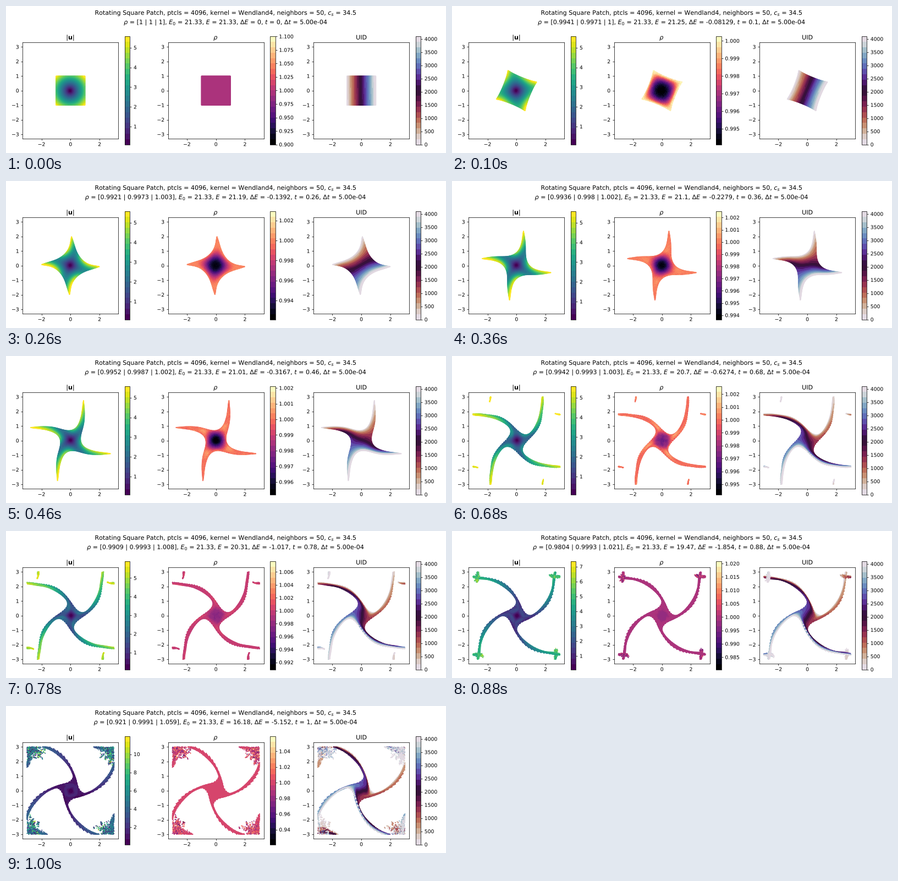
These frames come from a looping animation (800 by 267 pixels, 1020 ms). A matplotlib script:

```python
import numpy as np
import matplotlib.pyplot as plt
from matplotlib.animation import FuncAnimation
from matplotlib.patheffects import Normal
from matplotlib.text import Text
from numpy.polynomial.legendre import legvander

W, H, DPI = 800, 267, 64
FRAMES, INTERVAL = 51, 20
OMEGA, E0 = 4.0, 21.328

S = 25 / 24  # type and line scale
plt.rcParams.update({
    "font.family": "DejaVu Sans", "font.size": 10 * S, "text.hinting": "no_hinting",
    "axes.linewidth": 0.8 * S, "axes.titlepad": 6 * S,
})
for side in ("xtick", "ytick"):
    plt.rcParams.update({f"{side}.major.size": 3.5 * S, f"{side}.major.width": 0.8 * S,
                         f"{side}.major.pad": 3.5 * S})

# time, density min / mean / max, energy change, top speed
KNOTS = np.array([
    (0.00, 1.0000, 1.0000, 1.00000, 0.0, 5.57),
    (0.10, 0.9941, 0.9971, 1.00025, -0.08129, 5.57),
    (0.26, 0.9921, 0.9973, 1.0029, -0.1392, 5.57),
    (0.46, 0.9952, 0.9987, 1.0021, -0.3167, 5.57),
    (0.68, 0.9942, 0.9993, 1.0026, -0.6274, 5.57),
    (0.76, 0.9930, 0.9993, 1.0050, -0.8500, 5.60),
    (0.88, 0.9804, 0.9993, 1.0208, -1.854, 7.35),
    (1.00, 0.9210, 0.9991, 1.0590, -5.152, 11.95),
]).T


def simulate(n=41, c=20.0, sub=250):
    """Free patch of fluid on a Lagrangian mesh, spinning clockwise."""
    a = np.linspace(-1, 1, n)
    h = a[1] - a[0]
    x, y = np.meshgrid(a, a, indexing="ij")
    z = x + 1j * y
    v = -1j * OMEGA * z
    w = np.full(n, h)
    w[[0, -1]] /= 2
    mass = np.outer(w, w)
    m = 1 - ((a[1:] + a[:-1]) / 2) ** 2
    p0 = -9.4 * np.outer(m, m)

    def pressure(d1, d2):
        area = 0.5 * (d1.real * d2.imag - d1.imag * d2.real)
        return p0 + c * c * (1 - area / h**2)

    def diagonals():
        return z[1:, 1:] - z[:-1, :-1], z[:-1, 1:] - z[1:, :-1]

    def smooth(v, k=0.04):
        dx, dy = np.diff(v, 2, axis=0), np.diff(v, 2, axis=1)
        out = v.copy()
        for i, f in enumerate((-k, 2 * k, -k)):
            out[i:n - 2 + i] += f * dx
            out[:, i:n - 2 + i] += f * dy
        return out

    states = []
    for frame in range(FRAMES):
        p = np.pad(pressure(*diagonals()), 1)
        p = (p[1:, 1:] + p[:-1, 1:] + p[1:, :-1] + p[:-1, :-1]) / 4
        states.append((z.copy(), v.copy(), p / p[n // 2, n // 2]))
        if frame == FRAMES - 1:
            break
        # the late flow runs a little ahead of the clock
        dt = 0.02 / sub * (1 + 0.36 * (frame * 0.02) ** 5)
        kick = dt / mass
        for step in range(sub):
            d1, d2 = diagonals()
            p = 0.5j * pressure(d1, d2)
            g1, g2 = p * d2, p * d1
            f = np.zeros_like(z)
            f[1:, 1:] -= g1
            f[:-1, :-1] += g1
            f[:-1, 1:] += g2
            f[1:, :-1] -= g2
            v += kick * f
            if step % 10 == 0:
                v = smooth(v)
            z += dt * v
    return a, states


mesh, STATES = simulate()
M, DEG = 96, 15
grid = (np.arange(M) + 0.5) * 2 / M - 1
LIFT = legvander(grid, DEG) @ np.linalg.pinv(legvander(mesh, DEG))
cell = np.floor((grid + 1) * 32)
uid = np.add.outer(64 * cell, cell).ravel()


def particles(k):
    """Positions, speed and density of all particles in frame k."""
    t = k * 0.02
    rng = np.random.default_rng(7)
    z, v, p = ((LIFT @ q @ LIFT.T).ravel() for q in STATES[k])
    pos = np.column_stack([z.real, z.imag])
    speed = np.abs(v)
    rho = np.ones(p.size)
    if k:
        dip = min(1 - np.interp(t, KNOTS[0], KNOTS[1]), 0.0128 * np.exp(-2.13 * t))
        rho += rng.normal(0, 2e-4, p.size) - dip * np.clip(p, -0.3, 1)

    # periodic box, where arms crumple once they meet each other
    mix = np.clip((t - 0.78) / 0.22, 0, 1)
    over = np.maximum(np.abs(pos) - 3, 0)
    depth = (0.55 + 0.3 * mix) * np.tanh(over / 0.8)
    pos = np.where(over > 0, -np.sign(pos) * (3 - depth), pos)
    hit = mix**2 * np.clip(over.max(axis=1) / 0.3, 0, 1)
    clump = rng.integers(24, size=p.size)
    pos += 0.22 * hit[:, None] * rng.normal(size=(24, 2))[clump]
    pos = np.where(np.abs(pos) > 3, (pos + 3) % 6 - 3, pos)
    speed = speed * (1 + hit * rng.uniform(-0.9, 0.9, p.size))
    rho += 0.02 * hit * rng.normal(size=p.size)
    return pos, speed, rho


def box(x, y, w, h):
    return [x / W, 1 - (y + h) / H, w / W, h / H]


fig = plt.figure(figsize=(W / DPI, H / DPI), dpi=DPI, facecolor="white")
PANELS = ((r"$|\mathbf{u}|$", "viridis"), (r"$\rho$", "magma"), ("UID", "twilight_r"))
dots = []
for i, (title, cmap) in enumerate(PANELS):
    left = 264.4 * i
    ax = fig.add_axes(box(30.2 + left, 66.3, 174.2, 174.7))
    sc = ax.scatter(uid * 0, uid * 0, c=uid, s=5, lw=0, cmap=plt.get_cmap(cmap, 20))
    ax.set(xlim=(-3.3, 3.3), ylim=(-3.3, 3.3), xticks=(-2, 0, 2), yticks=range(-3, 4))
    ax.set_title(title)
    fig.colorbar(sc, cax=fig.add_axes(box(215.75 + left, 55.3, 9.7, 196.3)))
    dots.append(sc)


def line(y, text=""):
    return fig.text(0.5, 1 - y / H, text, ha="center", va="baseline", size=12 * S)


line(16, "Rotating Square Patch, ptcls = 4096, kernel = Wendland4, "
         "neighbors = 50, $c_s$ = 34.5")
status = line(33)


def draw(k):
    t = k * 0.02
    lo, mean, hi, de, top = (np.interp(t, KNOTS[0], row) for row in KNOTS[1:])
    pos, speed, rho = particles(k)
    for sc, val in zip(dots, (speed, rho, uid)):
        sc.set_offsets(pos)
        sc.set_array(val)
    dots[0].set_clim(0.088, top)
    dots[1].set_clim(*((lo, hi) if k else (0.9, 1.1)))
    status.set_text(
        rf"$\rho$ = [{lo:.4g} | {mean:.4g} | {hi:.4g}], $E_0$ = {E0:.4g}, "
        rf"$E$ = {E0 + de:.4g}, $\Delta E$ = {de:.4g}, $t$ = {t:.4g}, "
        r"$\Delta t$ = 5.00e-04")
    # outlines instead of bitmaps keep the letter spacing even
    for text in fig.findobj(Text):
        text.set_path_effects([Normal()])
    return dots + [status]


anim = FuncAnimation(fig, draw, frames=FRAMES, interval=INTERVAL,
                     init_func=lambda: draw(0), repeat=True, repeat_delay=0)
plt.show()
```
